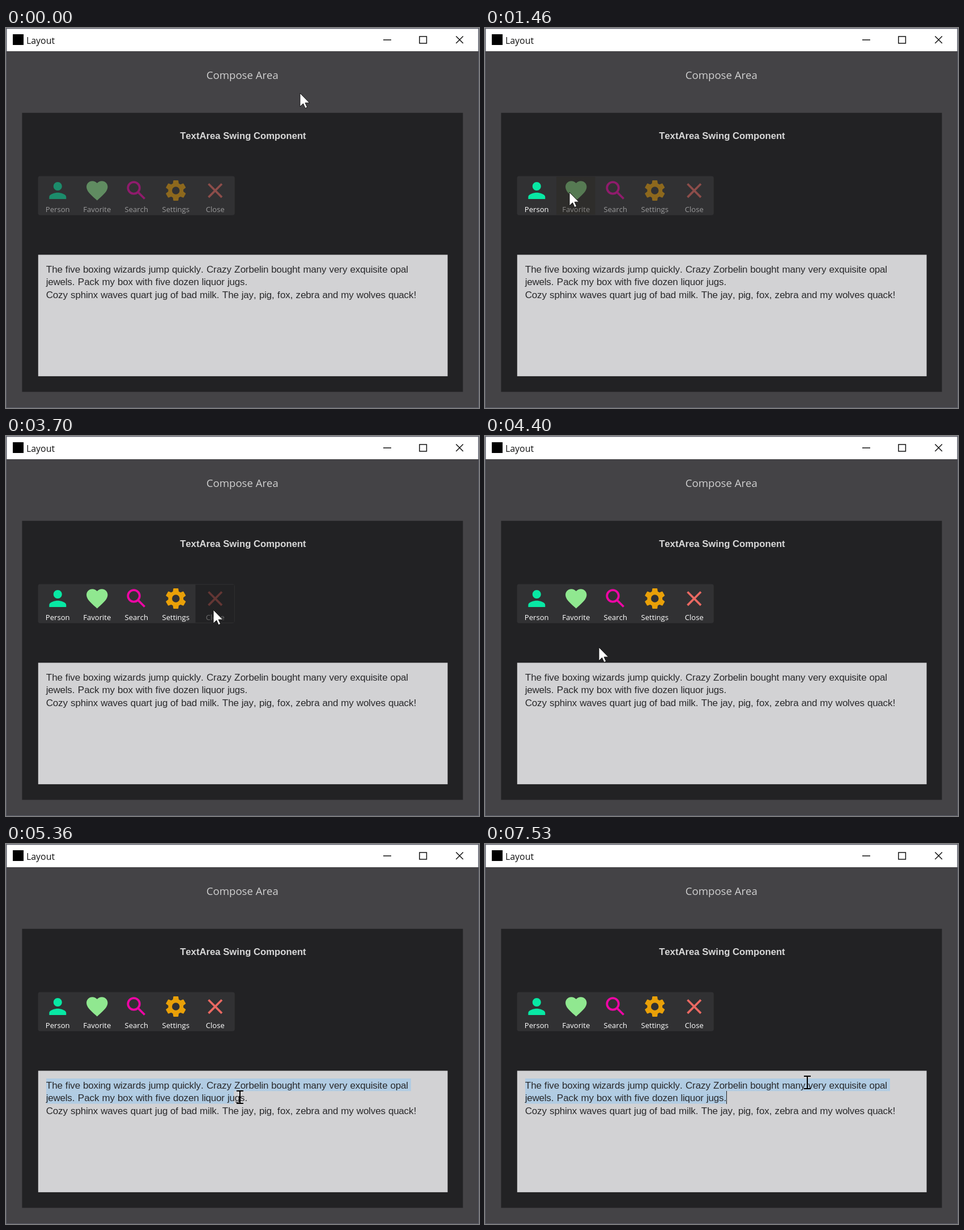
An HTML page with a canvas that plays this animation: 835x671 px, repeating every 7800 ms.

```html
<!DOCTYPE html>
<html lang="en">
<head>
<meta charset="utf-8">
<title>Layout</title>
<style>
  html, body { margin: 0; width: 100%; height: 100%; overflow: hidden; background: #444346; }
  canvas { display: block; width: 835px; height: 671px; }
</style>
</head>
<body>
<canvas id="stage" width="835" height="671"></canvas>
<script>
const ctx = document.getElementById('stage').getContext('2d');
const LOOP = 7800;
const UI = '"Open Sans", "Noto Sans", sans-serif';
const SWING = '"Liberation Sans", Arial, sans-serif';

// The text area is laid out with 24 px type on whole pixels, then shown smaller.
const LAYOUT_PX = 24, ZOOM = 0.71;

const BAR = { x: 56.5, y: 261.5, w: 347.3, h: 69, cell: 69.5 };
const AREA = { x: 56.8, y: 400.4, w: 722.8, h: 214.5 };
const TEXT_X = 70.7, LINE_TOP = 414, LINE_H = 22.3;
const LINE1_END = 715, LINE2_END = 426.5;
const LINES = [
  ['The five boxing wizards jump quickly. Crazy Zorbelin bought many very exquisite opal', 432],
  ['jewels. Pack my box with five dozen liquor jugs.', 454],
  ['Cozy sphinx waves quart jug of bad milk. The jay, pig, fox, zebra and my wolves quack!', 477]
];

const PERSON = new Path2D('M12 12c2.21 0 4-1.79 4-4s-1.79-4-4-4-4 1.79-4 4 1.79 4 4 4z' +
  'm0 2c-2.67 0-8 1.34-8 4v2h16v-2c0-2.66-5.33-4-8-4z');
const HEART = new Path2D('M12 21.35l-1.45-1.32C5.4 15.36 2 12.28 2 8.5 2 5.42 4.42 3 7.5 3' +
  'c1.74 0 3.41.81 4.5 2.09C13.09 3.81 14.76 3 16.5 3 19.58 3 22 5.42 22 8.5' +
  'c0 3.78-3.4 6.86-8.55 11.54z');
const ARROW = new Path2D('M0 0V24L5.6 18.6L9.2 26.6L12.8 25L9.2 17.2H16.8Z');
const GEAR = gearPath();

const BUTTONS = [
  { label: 'Person',   color: '#08e8a4', press: 860,  release: 1000, icon: () => ctx.fill(PERSON) },
  { label: 'Favorite', color: '#90e890', press: 1560, release: 1660, icon: () => ctx.fill(HEART) },
  { label: 'Search',   color: '#ee06a5', press: 2230, release: 2330, icon: drawSearch },
  { label: 'Settings', color: '#e9a008', press: 2900, release: 2930, icon: () => ctx.fill(GEAR, 'evenodd') },
  { label: 'Close',    color: '#ea6962', press: 3700, release: 3760, icon: drawCross }
];

// Pointer moves: each is a smooth path through [time, x, y], at rest at both ends.
const MOVES = [
  [[30, 519, 115], [760, 90, 292]],
  [[1230, 90, 292], [1460, 149, 290], [1530, 152, 291]],
  [[1680, 152, 291], [1900, 234, 293]],
  [[2380, 234, 293], [2630, 293, 302], [2730, 297, 303]],
  [[3090, 297, 303], [3300, 366, 307]],
  [[3970, 366, 307], [4760, 74, 423]],
  [[4770, 74, 423], [5000, 209, 426], [5030, 239, 428], [5460, 431, 449]],
  [[6170, 431, 449], [6300, 474, 437], [6630, 569, 421]]
];
const DRAG = MOVES[6];
const CARET_ON = [[5460, 6000], [6530, 7030], [7530, LOOP]];

function gearPath() {
  const p = new Path2D();
  const turn = (x, y, a) => [12 + x * Math.cos(a) - y * Math.sin(a), 12 + x * Math.sin(a) + y * Math.cos(a)];
  for (let k = 0; k < 6; k++) {
    const at = (x, y) => turn(x, y, k * Math.PI / 3);
    if (k) p.lineTo(...at(-2.75, -6.65)); else p.moveTo(...at(-2.75, -6.65));
    p.lineTo(...at(-2.4, -9.19));
    p.quadraticCurveTo(...at(-2.34, -9.6), ...at(-1.92, -9.6));
    p.lineTo(...at(1.92, -9.6));
    p.quadraticCurveTo(...at(2.34, -9.6), ...at(2.4, -9.19));
    p.lineTo(...at(2.75, -6.65));
  }
  p.closePath();
  p.moveTo(15.6, 12);
  p.arc(12, 12, 3.6, 0, Math.PI * 2);
  return p;
}

function rect(color, x, y, w, h) {
  ctx.fillStyle = color;
  ctx.fillRect(x, y, w, h);
}

function text(str, x, y, font, color, align = 'left') {
  ctx.font = font;
  ctx.fillStyle = color;
  ctx.textAlign = align;
  ctx.fillText(str, x, y);
}

function line(...pts) {
  ctx.beginPath();
  for (let i = 0; i < pts.length; i += 4) {
    ctx.moveTo(pts[i], pts[i + 1]);
    ctx.lineTo(pts[i + 2], pts[i + 3]);
  }
  ctx.stroke();
}

// Text whose letters advance by whole layout pixels.
function gridText(str, x, y, color) {
  ctx.save();
  ctx.translate(x, y);
  ctx.scale(ZOOM, ZOOM);
  let pen = 0;
  for (const ch of str) {
    text(ch, pen, 0, LAYOUT_PX + 'px ' + SWING, color);
    pen += Math.round(ctx.measureText(ch).width);
  }
  ctx.restore();
}

function drawSearch() {
  ctx.lineWidth = 2;
  ctx.beginPath();
  ctx.arc(9.5, 9.5, 5.5, 0, Math.PI * 2);
  ctx.moveTo(13.5, 13.5);
  ctx.lineTo(19.75, 19.75);
  ctx.stroke();
}

function drawCross() {
  ctx.lineWidth = 2;
  line(5.7, 5.7, 18.3, 18.3, 18.3, 5.7, 5.7, 18.3);
}

// Cubic Hermite through the keys of one move.
function along(keys, t) {
  const last = keys.length - 1;
  if (t >= keys[last][0]) return keys[last].slice(1);
  let i = 0;
  while (t >= keys[i + 1][0]) i++;
  const a = keys[i], b = keys[i + 1], span = b[0] - a[0], u = (t - a[0]) / span;
  const slope = (k, c) => k === 0 || k === last ? 0 :
    (keys[k + 1][c] - keys[k - 1][c]) / (keys[k + 1][0] - keys[k - 1][0]);
  return [1, 2].map(c => {
    const ease = u * u * (3 - 2 * u);
    return a[c] + (b[c] - a[c]) * ease +
      span * u * (1 - u) * ((1 - u) * slope(i, c) - u * slope(i + 1, c));
  });
}

function pointerAt(t) {
  let move = null;
  for (const m of MOVES) if (t >= m[0][0]) move = m;
  return move ? along(move, t) : MOVES[0][0].slice(1);
}

function drawWindow() {
  rect('#5a5c68', 0, 0, 835, 671);
  rect('#444346', 1, 41, 833, 629);
  rect('#ffffff', 1.4, 1.4, 832.2, 39.6);
  rect('#000000', 12, 11, 19, 19);
  text('Layout', 36, 28, '15.9px ' + UI, '#111');
  ctx.strokeStyle = '#111';
  ctx.lineWidth = 1.5;
  line(666, 21, 680, 21, 794.5, 14.5, 807, 27, 807, 14.5, 794.5, 27);
  ctx.strokeRect(730, 15, 12.5, 12);
  text('Compose Area', 417.3, 90, '18.6px ' + UI, '#d0d0d0', 'center');
  rect('#222224', 28.4, 149.8, 778.2, 492.7);
  text('TextArea Swing Component', 418.4, 196, 'bold 16.7px ' + SWING, '#d8d8d8', 'center');
}

function drawToolbar(t, [px, py]) {
  ctx.fillStyle = '#313133';
  ctx.beginPath();
  ctx.roundRect(BAR.x, BAR.y, BAR.w, BAR.h, 4);
  ctx.fill();
  const hovered = py > BAR.y && py < BAR.y + BAR.h ? Math.floor((px - BAR.x) / BAR.cell) : -1;
  BUTTONS.forEach((b, i) => {
    const left = BAR.x + i * BAR.cell, mid = left + BAR.cell / 2;
    ctx.save();
    ctx.globalAlpha = t >= b.release ? 1 : 0.5;
    text(b.label, mid, 325, '13.1px ' + UI, '#fff', 'center');
    ctx.translate(mid - 22.4, 264.6);
    ctx.scale(1.87, 1.87);
    ctx.fillStyle = ctx.strokeStyle = b.color;
    b.icon();
    ctx.restore();
    const pressed = t >= b.press && t < b.release;
    if (pressed || i === hovered) {
      rect(pressed ? 'rgba(0,0,0,.3)' : 'rgba(28,26,0,.15)', left, BAR.y + 1, BAR.cell - 1, BAR.h - 2);
    }
  });
}

function drawSelection(t) {
  if (t < 4800) return;
  // The highlight trails the pointer by one step, then stays once dragging ends.
  const [x, y] = along(DRAG, t >= 5460 ? t : t - 30);
  const second = LINE_TOP + LINE_H, color = '#b1cce3';
  const wrapped = y > second;
  rect(color, 71, LINE_TOP, (wrapped ? LINE1_END : x) - 71, LINE_H);
  if (wrapped) rect(color, 71, second, Math.min(x, LINE2_END) - 71, LINE_H);
}

function drawTextArea(t) {
  rect('#d2d2d4', AREA.x, AREA.y, AREA.w, AREA.h);
  drawSelection(t);
  for (const [str, y] of LINES) gridText(str, TEXT_X, y, '#29292b');
  if (CARET_ON.some(([on, off]) => t >= on && t < off)) rect('#222', 426, 436, 1, 23);
}

function drawPointer([x, y]) {
  ctx.save();
  ctx.translate(Math.round(x), Math.round(y));
  if (y >= AREA.y) {
    rect('#000', -1, -12, 2, 24);
    rect('#000', -6, -12, 12, 2);
    rect('#000', -6, 10, 12, 2);
  } else {
    ctx.fillStyle = '#fff';
    ctx.strokeStyle = '#111';
    ctx.lineWidth = 1;
    ctx.fill(ARROW);
    ctx.stroke(ARROW);
  }
  ctx.restore();
}

function draw(t) {
  const pointer = pointerAt(t);
  ctx.fontKerning = 'none';
  drawWindow();
  drawToolbar(t, pointer);
  drawTextArea(t);
  drawPointer(pointer);
}

// Thirty steps a second, on a 10 ms clock.
function tick() {
  const step = Math.floor((performance.now() % LOOP + 6.7) * 0.03);
  draw(Math.floor(step * 10 / 3) * 10);
  requestAnimationFrame(tick);
}
tick();
</script>
</body>
</html>
```
